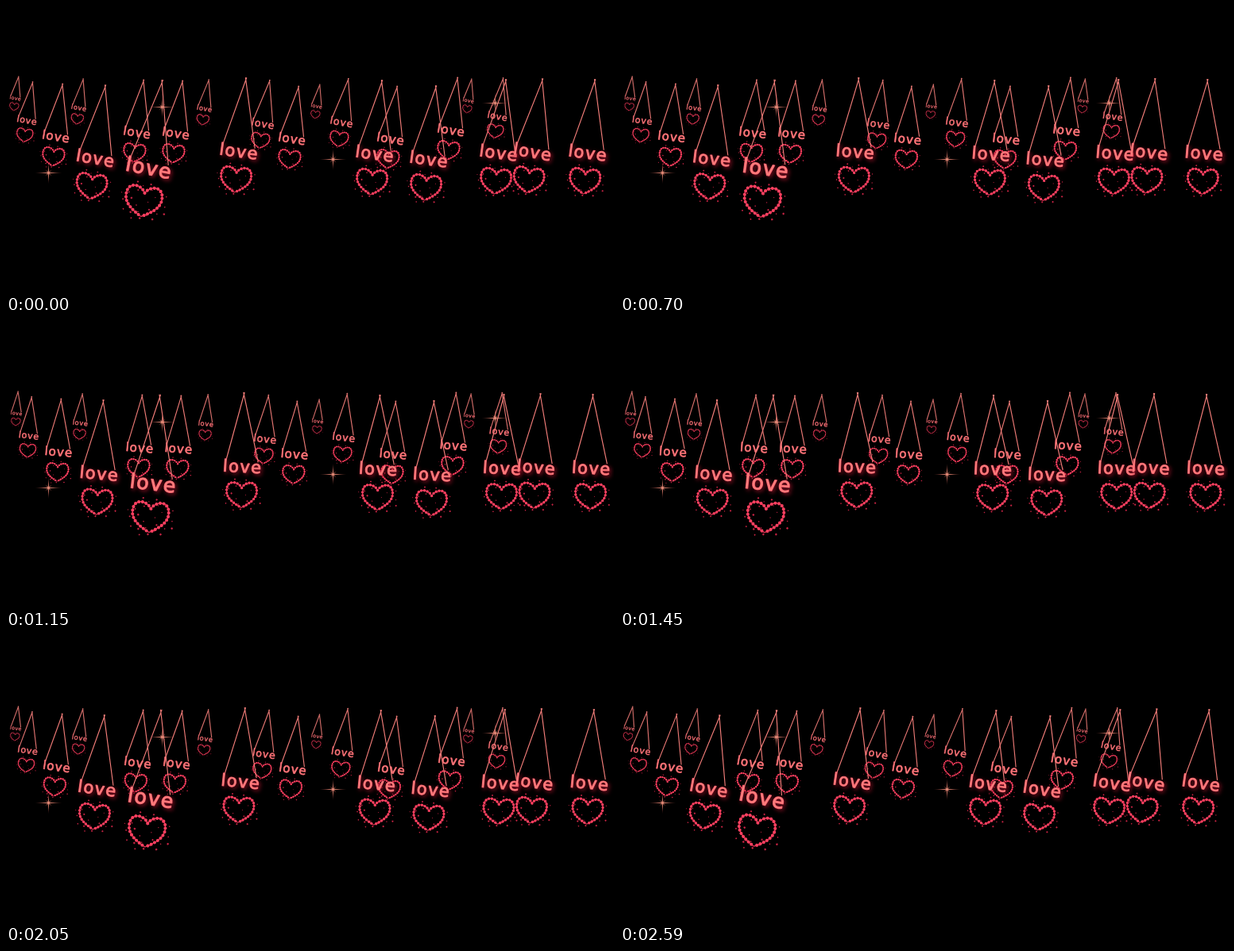
Write an HTML page with a canvas that moves like this. It is 765x362 px and loops after 2650 ms.

```html
<!DOCTYPE html>
<html lang="en">
<head>
<meta charset="utf-8">
<title>Swinging love hearts</title>
<style>
  html, body { margin: 0; height: 100%; overflow: hidden; background: #000; }
  canvas { display: block; }
</style>
</head>
<body>
<canvas id="stage" width="765" height="362"></canvas>
<script>
const ctx = document.getElementById('stage').getContext('2d');
const LOOP = 2650;
const RISE = 1510;   // ms from far left to far right
const LEAD = 60;     // the swing starts this long before the loop does
const SWING = 0.102; // radians between the two extremes

// Pendants by size, back to front: tilt at the far right, return easing, knots
const layers = [
  { scale: 0.3, tilt: 0.06, knots: [[15, 89], [394, 99], [585, 92]] },
  { scale: 0.4, tilt: 0.06, knots: [[96, 92], [254, 93]] },
  { scale: 0.53, tilt: 0.06, knots: [[32, 96], [624, 91]] },
  { scale: 0.6, tilt: 0.065, knots: [[330, 94], [429, 92]] },
  { scale: 0.72, tilt: 0.036, fall: 1.5,
    knots: [[69, 99], [171, 94], [220, 95], [366, 102], [490, 102], [566, 91]] },
  { scale: 1, tilt: 0.01, knots: [[299, 92], [470, 95], [538, 102], [626, 94], [738, 94]] },
  { scale: 1, tilt: 0.047, knots: [[122, 101], [672, 93]] },
  { scale: 1.2, tilt: 0.065, knots: [[193, 95]] }
];
const stars = [[53, 210], [196, 127], [411, 193], [615, 122]];

const heart = new Path2D();
for (const side of [-1, 1]) {
  heart.moveTo(0, -9);
  heart.bezierCurveTo(4 * side, -17, 19 * side, -20, 19 * side, -5);
  heart.bezierCurveTo(19 * side, 5, 9 * side, 11, 0, 16);
}

const sparks = Array.from({ length: 30 }, (_, i) => {
  const angle = i * 2.4;
  const radius = 5 + 22 * Math.sqrt(i / 30);
  return { x: radius * Math.cos(angle), y: 0.8 * radius * Math.sin(angle), r: 0.5 + i % 5 * 0.14 };
});

// 0 = far left, 1 = far right
function swing(time, fall) {
  const t = (time + LEAD) % LOOP;
  return t < RISE ? (t / RISE) ** 0.68 : ((LOOP - t) / (LOOP - RISE)) ** fall;
}

function drawStrings(scale) {
  ctx.strokeStyle = '#f47e7a';
  ctx.lineWidth = 1.15 / scale;
  ctx.beginPath();
  ctx.moveTo(-20.5, 52);
  ctx.lineTo(0.7, -34);
  ctx.moveTo(-0.7, -34);
  ctx.lineTo(20, 54);
  ctx.stroke();
}

function drawWord(glow) {
  ctx.save();
  ctx.translate(0.3, 67);
  ctx.rotate(0.035);
  ctx.font = '21px "DejaVu Sans", sans-serif';
  ctx.letterSpacing = '1.4px';
  ctx.textAlign = 'center';
  ctx.lineJoin = 'round';
  if (glow) {
    ctx.shadowColor = '#a8142c';
    ctx.shadowBlur = 5;
    ctx.shadowOffsetX = 2;
    ctx.shadowOffsetY = 2;
  }
  ctx.strokeStyle = '#f0586a';
  ctx.lineWidth = 1.1;
  ctx.strokeText('love', 0, 0);
  ctx.shadowColor = 'transparent';
  ctx.fillStyle = '#ff7e7c';
  ctx.fillText('love', 0, 0);
  ctx.restore();
}

function drawHeart() {
  ctx.save();
  ctx.translate(0, 95.5);
  ctx.fillStyle = '#c82444';
  for (const { x, y, r } of sparks) {
    ctx.fillRect(x - r, y - r / 2, 2 * r, r);
    ctx.fillRect(x - r / 2, y - r, r, 2 * r);
  }
  ctx.strokeStyle = '#d83050';
  ctx.lineWidth = 1.2;
  ctx.stroke(heart);
  ctx.strokeStyle = '#ff4060';
  ctx.lineCap = 'round';
  ctx.lineWidth = 3.4;
  ctx.setLineDash([0, 3.9]);
  ctx.stroke(heart);
  ctx.restore();
}

function drawPendant([x, y], { scale, tilt, fall = 1 }, time) {
  const arm = 32 * scale; // the pivot hangs this far below the knot
  ctx.save();
  ctx.translate(x - arm * Math.sin(tilt), y + arm * Math.cos(tilt));
  ctx.rotate(tilt + SWING * (1 - swing(time, fall)));
  ctx.scale(scale, scale);
  ctx.globalAlpha = Math.min(1, 0.75 + 0.3 * scale);
  drawStrings(scale);
  drawWord(scale >= 1);
  drawHeart();
  ctx.restore();
}

function drawRay(angle, length) {
  const fade = ctx.createRadialGradient(0, 0, 0, 0, 0, length);
  fade.addColorStop(0, '#e8907c');
  fade.addColorStop(1, 'rgba(190, 80, 70, 0.3)');
  ctx.save();
  ctx.rotate(angle);
  ctx.fillStyle = fade;
  ctx.beginPath();
  ctx.moveTo(-length, 0);
  ctx.lineTo(0, -0.8);
  ctx.lineTo(length, 0);
  ctx.lineTo(0, 0.8);
  ctx.fill();
  ctx.restore();
}

function drawStar([x, y]) {
  ctx.save();
  ctx.translate(x + 0.5, y + 0.5);
  drawRay(0, 17);
  drawRay(Math.PI / 2, 14);
  drawRay(Math.PI / 4, 6);
  drawRay(-Math.PI / 4, 6);
  ctx.restore();
}

function draw() {
  const time = performance.now() % LOOP;
  ctx.clearRect(0, 0, 765, 362);
  for (const layer of layers) {
    for (const knot of layer.knots) drawPendant(knot, layer, time);
  }
  stars.forEach(drawStar);
  requestAnimationFrame(draw);
}
draw();
</script>
</body>
</html>
```
